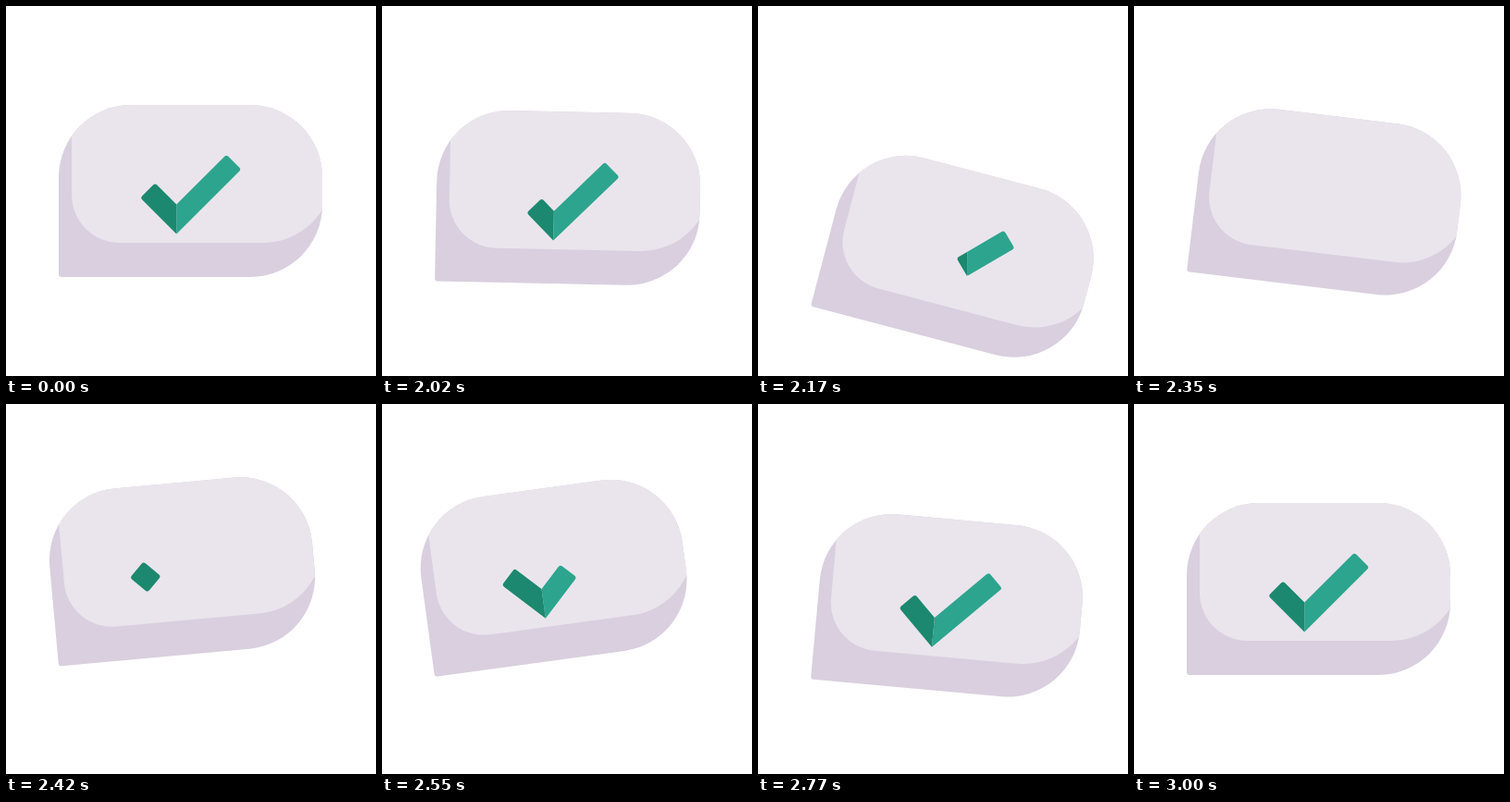
Write an HTML page that moves like this. It is 400 px wide and 400 px high and loops after 3020 ms.

```html
<!DOCTYPE html>
<html lang="en">
<head>
<meta charset="utf-8">
<title>Check bubble</title>
<style>
  html, body { margin: 0; width: 100%; height: 100%; overflow: hidden; background: #fff; }
  svg { display: block; width: 100%; height: 100%; }
</style>
</head>
<body>
<svg viewBox="0 0 400 400">
  <defs>
    <clipPath id="outline">
      <path id="bubble" d="M57 185A78 78 0 0 1 135 107H264A78 78 0 0 1 342 185V215A78 78 0 0 1 264 293H60Q57 293 57 290Z"/>
    </clipPath>
  </defs>
  <g id="body">
    <use href="#bubble" fill="#d9cfdf"/>
    <path clip-path="url(#outline)" fill="#eae5ec" d="M71 100V204A52 52 0 0 0 123 256H278A75 75 0 0 0 353 181V100Z"/>
    <path id="light" fill="#2da48e"/>
    <path id="dark" fill="#1c886f"/>
  </g>
</svg>
<script>
const LOOP = 3020, START = 2020;
const HALF = 11.3, LEFT = -44, TIP = 87.7;   // half width and ends of the check arms
const [body, light, dark] = ['body', 'light', 'dark'].map(id => document.getElementById(id));

// Keys are [time, value, easing skew towards the end of the segment].
const tilt = [[1980, 0], [2208, 15.8], [2475, -10, 1.45], [2775, 5.2], [3000, 0]];
const drop = [[1970, 0], [2175, 31.5], [2395, -10], [2635, 6.5], [3000, 0]];

const clamp = (x, lo, hi) => Math.min(hi, Math.max(lo, x));

function track(keys, t) {
  const i = keys.findIndex(key => key[0] > t);
  if (i < 0) return keys[keys.length - 1][1];
  if (i === 0) return keys[0][1];
  const [t0, v0] = keys[i - 1], [t1, v1, skew = 1] = keys[i];
  const u = ((t - t0) / (t1 - t0)) ** skew;
  return v0 + (v1 - v0) * (1 - Math.cos(Math.PI * u)) / 2;
}

// Arm coordinates: x runs down the short arm, y up the long one.
const place = ([x, y, r = 0]) => [184.3 + (x + y) * Math.SQRT1_2, 230.6 + (x - y) * Math.SQRT1_2, r];

function polygon(points) {
  const pts = points.map(place), n = pts.length;
  const toward = (a, b) => {
    const len = Math.hypot(b[0] - a[0], b[1] - a[1]);
    const k = len ? Math.min(a[2] / len, 0.5) : 0;
    return `${(a[0] + (b[0] - a[0]) * k).toFixed(2)} ${(a[1] + (b[1] - a[1]) * k).toFixed(2)}`;
  };
  return pts.map((p, i) =>
    `${i ? 'L' : 'M'}${toward(p, pts[(i + n - 1) % n])}Q${p[0].toFixed(2)} ${p[1].toFixed(2)} ${toward(p, pts[(i + 1) % n])}`
  ).join('') + 'Z';
}

const shortArm = from => [[from, HALF, 3], [from, -HALF, 3], [HALF, -HALF], [-HALF, HALF]];
const longArm = to => [[-HALF, HALF], [HALF, -HALF], [HALF, to, 3], [-HALF, to, 3]];

// The tail runs along the check and wipes it out.
function erased(dist) {
  const tail = LEFT + dist;
  if (tail < -HALF) return [shortArm(tail), longArm(TIP)];
  if (tail >= TIP) return [[], []];
  const lead = tail + 2 * HALF * (TIP - tail) / (TIP + HALF);
  const inner = [-HALF, lead];
  return [
    [[-HALF, tail, 3], [HALF, tail], inner],
    [inner, [HALF, tail, 2], [HALF, TIP, 3], [-HALF, TIP, 3]]
  ];
}

// The tip runs down the short arm, then up the long one.
function drawn(dist, stretch) {
  const from = LEFT - stretch, tip = LEFT + dist;
  if (dist <= 0) return [[], []];
  if (tip < -HALF) return [[[from, HALF, 3], [from, -HALF, 3], [tip, -HALF, 3], [tip, HALF, 3]], []];
  if (tip < HALF) {
    return [
      [[from, HALF, 3], [from, -HALF, 3], [tip, -HALF], [tip, -tip], [-HALF, HALF]],
      [[-HALF, HALF], [tip, -tip], [tip, HALF]]
    ];
  }
  return [shortArm(from), longArm(Math.min(tip, TIP))];
}

function checkAt(t) {
  if (t < START) return erased(0);
  if (t < 2370) return erased(0.39 * (t - 1985));
  return drawn(0.52 * (t - 2380), 4 * clamp((2650 - t) / 100, 0, 1));
}

// Poses change every 25 ms, rounded up to 10 ms.
function hold(t) {
  const d = t - START;
  return d < 0 ? 0 : START + 50 * Math.floor(d / 50) + (d % 50 >= 30 ? 30 : 0);
}

function render(time) {
  const t = hold(time % LOOP);
  const angle = t ? track(tilt, t) : 0, y = t ? track(drop, t) : 0;
  body.setAttribute('transform', `translate(0 ${y.toFixed(3)}) rotate(${angle.toFixed(3)} 57 293)`);
  const [a, b] = checkAt(t);
  dark.setAttribute('d', a.length ? polygon(a) : '');
  light.setAttribute('d', b.length ? polygon(b) : '');
}

const origin = performance.now();
function loop() {
  render(performance.now() - origin);
  requestAnimationFrame(loop);
}
loop();
</script>
</body>
</html>
```
